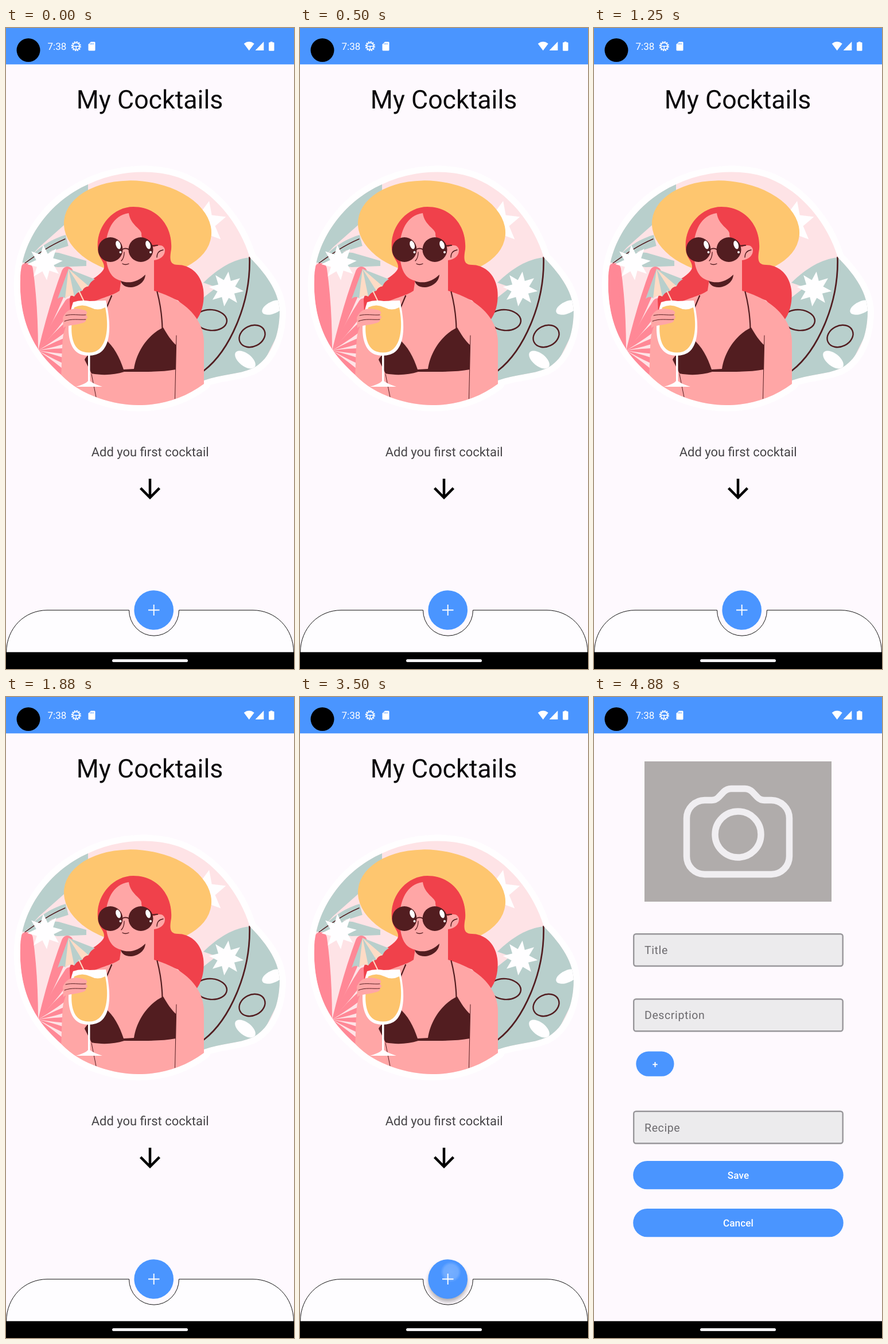
Recreate the animation shown at these times as an HTML page. Size 502x1115 px, loop 5.01 s.

```html
<!DOCTYPE html>
<html lang="en">
<head>
<meta charset="utf-8">
<title>My Cocktails</title>
<style>
  html, body { margin: 0; width: 100%; height: 100%; overflow: hidden; background: #fef9fe; }
  svg { display: block; width: 502px; height: 1115px; }
  text { font-family: Roboto, "Open Sans", sans-serif; text-rendering: geometricPrecision; }
  .mid { text-anchor: middle; }
  .skin { fill: #ffa6a6; }
  .dark { fill: #521d20; }
  .teal { fill: #b8cfcc; }
  .red { fill: #f0414b; }
  .coral { fill: #ff8896; }
  .white { fill: #fffeff; }
  .blue { fill: #4a95ff; }
  .line { fill: none; stroke: #521d20; stroke-linecap: round; }
  .field rect { fill: #ecebed; stroke: #98969a; stroke-width: 2.4; }
  .field text { fill: #6c6a6e; font-size: 19.5px; letter-spacing: .61px; }
  .btn { fill: #fff; font-size: 17.1px; font-weight: 500; letter-spacing: .12px; text-anchor: middle; }
</style>
</head>
<body>
<svg viewBox="0 0 502 1115">
  <defs>
    <path id="blob" d="M25 437C27 370 75 302 143 272C195 247 260 244 306 262C363 285 407 340 425 399C450 425 475 455 477 492C477 540 458 578 430 592C405 603 375 602 345 613V619C310 645 270 656 230 656C190 656 130 640 97 604C50 565 22 510 25 437Z"/>
    <clipPath id="cut"><use href="#blob"/></clipPath>
    <radialGradient id="glow">
      <stop offset="0" stop-color="#fff" stop-opacity=".24"/>
      <stop offset=".7" stop-color="#fff" stop-opacity=".2"/>
      <stop offset="1" stop-color="#fff" stop-opacity="0"/>
    </radialGradient>
    <filter id="soft" x="-30%" y="-30%" width="160%" height="160%"><feGaussianBlur stdDeviation="3.5"/></filter>
  </defs>
  <rect width="502" height="1115" fill="#fef9fe"/>

  <g id="home">
    <text class="mid" x="250.6" y="140" font-size="44.7" fill="#0a090b">My Cocktails</text>

    <use href="#blob" fill="#fffeff" stroke="#fffeff" stroke-width="22" stroke-linejoin="round"/>
    <g clip-path="url(#cut)">
      <rect x="14" y="240" width="475" height="430" fill="#fee3e6"/>
      <!-- foliage -->
      <path class="teal" d="M20 250H143V290L108 322L101 343L58 381L33 408H20Z"/>
      <path class="teal" d="M34 408C55 380 85 365 104 360L110 384L78 387L140 405V414L90 416Z"/>
      <path fill="#fee3e6" d="M74 390L112 378L118 392Z"/>
      <path class="line" stroke-width="1.5" d="M33 409C54 394 75 379 103 367"/>
      <g id="fronds" class="coral"></g>
      <path class="teal" d="M425 399C396 402 370 418 344 443L367 451L344 469L330 500V620L440 600L490 500V399Z"/>
      <path class="line" stroke-width="2.7" d="M424.500 399C427 480 389 562 345 596"/>
      <ellipse class="line" stroke-width="2.4" cx="357.500" cy="508" rx="27.500" ry="18" transform="rotate(5 357 508)"/>
      <ellipse class="line" stroke-width="2.4" cx="429" cy="536" rx="23.500" ry="18" transform="rotate(-26 429 536)"/>
      <ellipse class="white" cx="466" cy="486" rx="21" ry="10.500" transform="rotate(-24 466 486)"/>
      <ellipse class="white" cx="417" cy="577" rx="21" ry="11" transform="rotate(38 417 577)"/>
      <g id="stars" class="white"></g>

      <!-- hat, hair, body -->
      <ellipse fill="#fec66f" cx="229.500" cy="348" rx="129" ry="82" transform="rotate(6 229.500 348)"/>
      <path class="red" d="M222 311C186 311 156 346 160 385C161 402 175 408 170 420C160 438 112 452 111 472L112 500L190 475L258 458L300 474L332 508C344 492 346 470 344 455C340 425 318 412 300 412C285 412 285 402 288 385C291 345 264 311 222 311Z"/>
      <path class="skin" d="M202 430L198 457C184 467 160 470 140 483C118 496 102 512 99 540C97 565 97 590 96 610V670H345V545C344 508 316 474 258 457V404C270 403 277 395 277 387C277 378 267 375 258 381L238 372L236 359C238 350 217 344 214 322C184 326 172 358 174 392C175 420 183 437 203 440Z"/>
      <path class="dark" d="M200 440C216 446 232 440 243 429C242 446 222 454 210 450C204 448 201 444 200 440Z"/>
      <path class="line" stroke-width="1.3" d="M263 399C263 391 268 387 274 386M206 390C206 397 205 401 201 405M203 410Q208 413 214 410"/>
      <path class="line" stroke-width="2" d="M203 385Q208 382 214 385M254 379L264 378"/>
      <g class="dark"><circle cx="182" cy="385.500" r="21.500"/><circle cx="235" cy="385.500" r="21.500"/></g>
      <g class="white">
        <ellipse cx="195.500" cy="377.500" rx="4" ry="7.500" transform="rotate(-18 195 377)"/>
        <ellipse cx="247.500" cy="377.500" rx="4" ry="7.500" transform="rotate(-18 247 377)"/>
        <circle cx="199.500" cy="390" r="2"/><circle cx="252" cy="390" r="2"/>
      </g>
      <path class="line" stroke-width="2.2" d="M184 466L170 499M263.500 459C269 480 272 502 272.500 523"/>
      <path class="dark" d="M172 541C160 555 140 569 137 577L149 601C170 605 190 603 206 598H222C250 598 275 598 296 594V551C288 544 281 533 274 521C250 532 228 560 223 593L205 594C198 573 188 553 172 541Z"/>
      <path class="line" stroke-width="1" d="M297 535L294.500 645M149 602L157 642"/>

      <!-- drink -->
      <path class="teal" d="M109 419L90 471Q97 465 103 470Q111 463 119 467Q124 459 133 457Q136 450 144 449Q147 441 155 437Z"/>
      <path fill="#fedbc5" d="M109 419L103 470Q111 463 119 467ZM109 419L133 457Q136 450 144 449Z"/>
      <path fill="none" stroke="#fedbc5" stroke-width="2" d="M127 457L139 482"/>
      <path class="white" d="M117 477Q130 472 146 475L174 474C184 515 184 560 157 568Q144 572 131 568C104 558 105 512 117 477Z"/>
      <path fill="#fdc46d" d="M119 486C111 518 111 556 134 563Q145 566 155 563C178 554 179 515 173 486Q160 493 147 486Q133 479 119 486Z"/>
      <path class="white" d="M143 567H146.500V614Q150 618 168 624H122Q139 619 143 614Z"/>
      <path class="skin" d="M99 504C105 488 120 485 138 491Q144 495 139 499Q145 503 139 507Q141 512 130 514C118 518 106 516 100 522Z"/>
      <path class="line" stroke-width="1" d="M104 500C115 497 128 500 139 499M102 510C114 505 127 508 139 507"/>
    </g>

    <text class="mid" x="251.200" y="744.500" font-size="21.960" fill="#464447">Add you first cocktail</text>
    <path transform="translate(224 775) scale(2.25)" d="M20 12l-1.410-1.410L13 16.170V4h-2v12.170l-5.580-5.590L4 12l8 8 8-8z"/>

    <path fill="#fefdff" stroke="#111" d="M.5 1086C1 1044 32 1012.700 72 1012.700H214.500A43.500 44.500 0 0 0 301.500 1012.700H430C470 1012.700 501 1044 501.500 1086"/>
    <circle id="shade" cx="257.700" cy="1018" r="34" fill="#000" opacity=".3" filter="url(#soft)"/>
    <circle class="blue" cx="257.700" cy="1012.500" r="34.300"/>
    <circle id="ripple" cx="263" cy="1000" r="18" fill="url(#glow)"/>
    <path stroke="#fff" stroke-width="1.900" d="M248 1012.500H267.500M257.700 1003V1022"/>
  </g>

  <g id="form">
    <rect x="88" y="112" width="326" height="244" fill="#b0acab"/>
    <g fill="none" stroke="#f0eef1" stroke-width="11.500">
      <path d="M193 179.500H205Q212 179.500 217 174.500L226 165Q232 159.500 239 159.500H263Q270 159.500 276 165L285 174.500Q290 179.500 297 179.500H309A31.500 31.500 0 0 1 340.500 211V277A31.500 31.500 0 0 1 309 308.500H193A31.500 31.500 0 0 1 161.500 277V211A31.500 31.500 0 0 1 193 179.500Z"/>
      <circle cx="251" cy="239" r="40"/>
    </g>
    <g id="fields" class="field"></g>
    <rect class="blue" x="73.300" y="616.500" width="66.200" height="43.300" rx="21.600"/>
    <text class="btn" x="106.500" y="644.500">+</text>
    <rect class="blue" x="68.200" y="807" width="366.500" height="49.300" rx="24.600"/>
    <text class="btn" x="251.500" y="838">Save</text>
    <rect class="blue" x="68.200" y="890" width="366.500" height="49.300" rx="24.600"/>
    <text class="btn" x="251.500" y="921">Cancel</text>
  </g>

  <!-- system bars -->
  <rect class="blue" width="502" height="63.300"/>
  <circle cx="39" cy="38.500" r="20.500"/>
  <g fill="#fff">
    <text x="72.500" y="38" font-size="17.100">7:38</text>
    <g fill="none" stroke="#fff">
      <circle cx="122.300" cy="31.700" r="7.600" stroke-width="2" stroke-dasharray="2.400 1.580"/>
      <circle cx="122.300" cy="31.700" r="6" stroke-width="1.600"/>
      <path stroke-width="1.500" d="M116.500 31.700H128M122.300 32V37.500"/>
    </g>
    <path d="M148 24H154Q155.500 24 155.500 25.500V38Q155.500 39.500 154 39.500H145Q143.500 39.500 143.500 38V28.500Z"/>
    <path d="M414.700 27.200Q423.700 20.500 432.700 27.200L423.700 39.200Z"/>
    <path d="M449.300 23.800V39H434.500Z"/>
    <path d="M460.700 23.700H464.500V25H466.500Q467.500 25 467.500 26V38.500Q467.500 39.700 466.300 39.700H459.200Q458 39.700 458 38.500V26Q458 25 459 25H460.700Z"/>
  </g>
  <g stroke="#4a95ff" stroke-width=".9"><path d="M147 26V29M149.500 26V29M152 26V29"/></g>
  <rect y="1085.700" width="502" height="29.300"/>
  <rect x="185" y="1098" width="132" height="5" rx="2.500" fill="#f4f2f5"/>
</svg>
<script>
  const $ = id => document.getElementById(id);

  function star(cx, cy, outer, inner, turn, n) {
    const pts = Array.from({ length: n * 2 }, (_, i) => {
      const r = i % 2 ? inner : outer, a = turn + i * Math.PI / n;
      return [cx + r * Math.sin(a), cy - r * Math.cos(a)].map(v => v.toFixed(1));
    });
    return `<polygon points="${pts.join(' ')}"/>`;
  }
  $('stars').innerHTML = star(68, 408, 31, 16, -.1, 8) +
    star(384, 454, 30.5, 16, .12, 8) + star(345, 340, 40, 20, .23, 6);

  // Blades fan out from one root: tip x, tip y, half width
  const root = [56, 561];
  const blades = [[36, 420, 11], [107, 425, 10], [111, 479, 9], [114, 512, 7],
    [114, 540, 5], [114, 562, 5], [114, 584, 5], [104, 604, 5], [82, 614, 5]];
  $('fronds').innerHTML = blades.map(([x, y, w]) => {
    const dx = x - root[0], dy = y - root[1], len = Math.hypot(dx, dy);
    const nx = -dy / len * w, ny = dx / len * w;
    const mx = root[0] + dx * .55, my = root[1] + dy * .55;
    return `<path d="M${root}Q${mx + nx} ${my + ny} ${x + nx} ${y + ny}` +
      `A${w} ${w} 0 0 0 ${x - nx} ${y - ny}Q${mx - nx} ${my - ny} ${root}Z"/>`;
  }).join('') + '<path d="M25 420Q20 505 56 561L40 425Z"/>';

  $('fields').innerHTML = [['Title', 412.2], ['Description', 525.5], ['Recipe', 720.7]].map(([label, y]) =>
    `<rect x="69.200" y="${y}" width="364.500" height="55.800" rx="4"/><text x="88" y="${y + 34.8}">${label}</text>`).join('');

  // Start time, view, pressed
  const steps = [[0, 'home', false], [3500, 'home', true], [3630, 'form', false]];
  const loop = 5010, start = performance.now();

  function draw(now) {
    const t = Math.max(0, now - start) % loop;
    const [, view, pressed] = steps.filter(s => s[0] <= t).pop();
    for (const id of ['home', 'form']) $(id).style.display = id === view ? '' : 'none';
    for (const id of ['shade', 'ripple']) $(id).style.display = pressed ? '' : 'none';
    requestAnimationFrame(draw);
  }
  draw(start);
</script>
</body>
</html>
```
